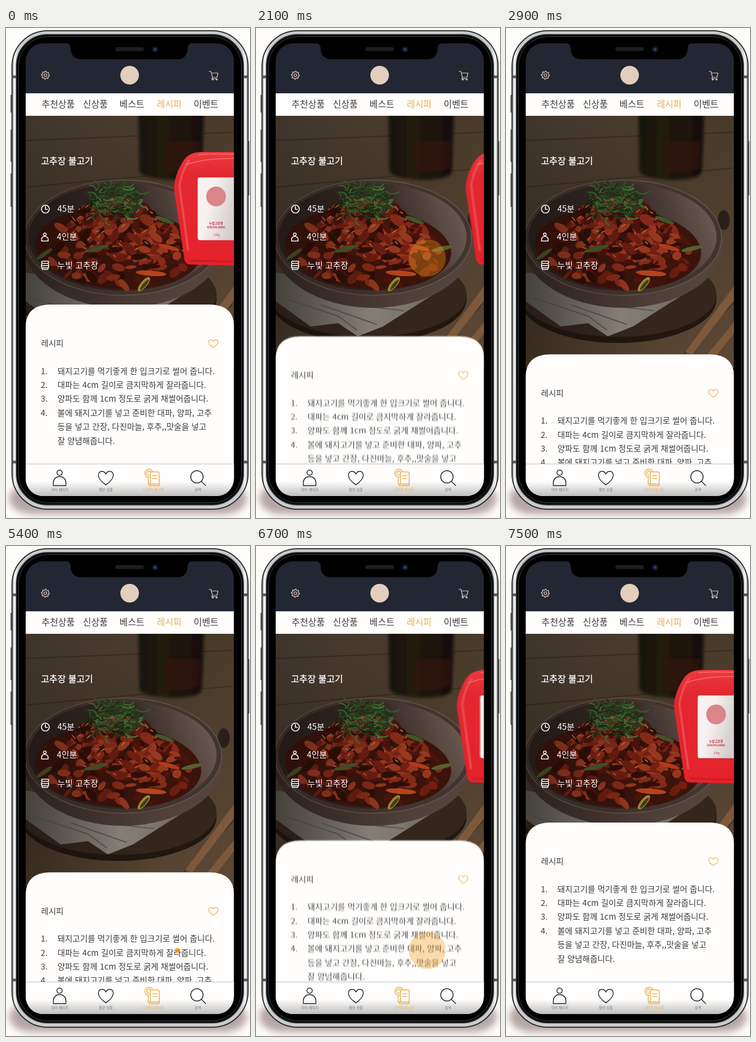
Write an HTML page that moves like this. It is 446 px wide and 893 px high and loops after 9800 ms.

```html
<!DOCTYPE html>
<html lang="ko">
<head>
<meta charset="utf-8">
<style>
html, body { margin: 0; width: 100%; height: 100%; overflow: hidden; background: #fffdf9; }
svg { display: block; width: 100vw; height: 100vh; }
text { font-family: "Noto Sans CJK KR", "Noto Sans CJK", "Noto Sans", sans-serif; font-size: 15.3px; fill: #3d3d3f; white-space: pre; }
.tabs text { font-size: 16.5px; }
.sheet text { font-size: 15px; }
.photo text { fill: #fff; }
.bar text { font-size: 6.4px; fill: #77777a; text-anchor: middle; }
.label text { font-size: 5.6px; font-weight: 700; fill: #c2303a; text-anchor: middle; }
.line { fill: none; stroke-linecap: round; stroke-linejoin: round; }
.tabs .on, .bar .on { fill: #edae4a; }
</style>
</head>
<body>
<svg viewBox="0 0 446 893">
<defs>
  <linearGradient id="steel">
    <stop offset="0" stop-color="#7d8082"/><stop offset=".01" stop-color="#f4f5f5"/>
    <stop offset=".03" stop-color="#c9cbcc"/><stop offset=".97" stop-color="#c9cbcc"/>
    <stop offset=".99" stop-color="#f4f5f5"/><stop offset="1" stop-color="#7d8082"/>
  </linearGradient>
  <linearGradient id="wood" x2=".9" y2="1">
    <stop offset="0" stop-color="#54473a"/><stop offset=".4" stop-color="#463829"/>
    <stop offset="1" stop-color="#5c4734"/>
  </linearGradient>
  <linearGradient id="jar">
    <stop offset="0" stop-color="#15110c"/><stop offset=".35" stop-color="#221c0f"/>
    <stop offset="1" stop-color="#170d0a"/>
  </linearGradient>
  <linearGradient id="bowl" x2="1" y2=".3">
    <stop offset="0" stop-color="#2f2521"/><stop offset="1" stop-color="#54433b"/>
  </linearGradient>
  <linearGradient id="well" x2="1" y2="-.2">
    <stop offset="0" stop-color="#2c221f"/><stop offset=".5" stop-color="#352823"/>
    <stop offset="1" stop-color="#79685f"/>
  </linearGradient>
  <linearGradient id="cloth" x2="1"><stop stop-color="#5a5650"/><stop offset=".6" stop-color="#8d877d"/><stop offset="1" stop-color="#6b655c"/></linearGradient>
  <linearGradient id="dark" x2="1"><stop stop-color="#0b0705" stop-opacity=".28"/><stop offset=".6" stop-color="#0b0705" stop-opacity="0"/></linearGradient>
  <linearGradient id="red" x2="0" y2="1">
    <stop offset="0" stop-color="#ee3a3f"/><stop offset=".2" stop-color="#e22830"/><stop offset="1" stop-color="#e5222b"/>
  </linearGradient>
  <linearGradient id="paper" x2="1" y2=".4"><stop offset=".4" stop-color="#f7f1f0"/><stop offset="1" stop-color="#d5cfcf"/></linearGradient>
  <linearGradient id="fade" x2="0" y2="1"><stop stop-color="#999" stop-opacity="0"/><stop offset="1" stop-color="#999" stop-opacity=".65"/></linearGradient>
  <filter id="soft" x="-20%" y="-100%" width="140%" height="300%"><feGaussianBlur stdDeviation="7"/></filter>
  <filter id="haze"><feGaussianBlur stdDeviation="2.5"/></filter>
  <filter id="blurX"><feGaussianBlur/></filter>
  <filter id="blurY"><feGaussianBlur/></filter>
  <clipPath id="screen"><rect x="36" y="28" width="380.500" height="825" rx="32"/></clipPath>
  <path id="heart" d="M0 12.500C-19 0 -14.500 -12 -7.500 -12C-3.500 -12 -1 -9.500 0 -7C1 -9.500 3.500 -12 7.500 -12C14.500 -12 19 0 0 12.500Z"/>
  <path id="person" d="M-11.500 14V8A11.500 10.500 0 0 1 11.500 8V14ZM0 -14.500A4.900 4.900 0 1 1 -.01 -14.500Z"/>
</defs>

<!-- phone body -->
<rect x="6" y="830" width="434" height="56" rx="40" fill="#b5a5a6" filter="url(#soft)"/>
<path d="M10 122V154M10 185V244M10 265V326M443 206V305" stroke="#6f7274" stroke-width="4"/>
<rect x="11" y="5" width="431.500" height="872" rx="65" fill="url(#steel)" stroke="#2d2f30" stroke-width="2"/>
<path d="M11 89H20M433 89H442M11 791H20M433 791H442" stroke="#56595b" stroke-width="5"/>
<rect x="19" y="12" width="415" height="857" rx="57" stroke="#303233" stroke-width="2"/>
<rect x="22.500" y="15.500" width="408" height="850" rx="54" stroke="#4a4c4e"/>

<g clip-path="url(#screen)">
  <g class="photo">
    <rect x="36" y="160" width="381" height="460" fill="url(#wood)"/>
    <path d="M36 205L417 190M36 290L417 255M300 620L417 500" stroke="#2a2018" stroke-width="2" opacity=".5"/>
    <path d="M242 150H362L358 262Q354 277 300 277Q248 274 244 260Z" fill="url(#jar)" filter="url(#haze)"/>
    <path d="M290 205H356L353 255Q325 266 290 262Z" fill="#351511" opacity=".65" filter="url(#haze)"/>
    <ellipse cx="205" cy="494" rx="180" ry="80" fill="#21170f"/>
    <ellipse cx="205" cy="486" rx="180" ry="77" fill="#35261c"/>
    <path d="M30 445L327 484L232 544L186 562L150 538L100 544L30 494Z" fill="url(#cloth)"/>
    <path d="M50 492L150 525L184 550M120 505L220 540M180 505L270 515" class="line" stroke="#5a564f" stroke-width="2"/>
    <path d="M420 466L328 590L340 595L420 492ZM420 532L369 594L384 598L420 552Z" fill="#7d593b"/>
    <ellipse cx="398" cy="350" rx="11" ry="18" fill="#2a201b"/>
    <ellipse cx="214" cy="393" rx="183" ry="117" fill="url(#bowl)"/>
    <ellipse cx="214" cy="382" rx="180" ry="105" fill="#42342e" stroke="#69574d" stroke-width="1.500"/>
    <ellipse cx="213" cy="381" rx="172" ry="98" fill="url(#well)"/>
    <ellipse cx="205" cy="402" rx="152" ry="74" fill="#3a130b" transform="rotate(4 205 402)"/>
    <g id="food"></g>
    <rect x="36" y="160" width="381" height="460" fill="url(#dark)"/>

    <text x="64" y="248" style="font-size:16.400px;font-weight:500" stroke="#fff" stroke-width=".3">고추장 불고기</text>
    <text x="94" y="335">45분</text>
    <text x="93" y="386">4인분</text>
    <text x="94" y="438">누빛 고추장</text>
    <g class="line" stroke="#fff" stroke-width="1.600">
      <circle cx="72" cy="330" r="7.200"/><path d="M72 325V330.500H76"/>
      <use href="#person" transform="translate(71 381) scale(.52)" stroke-width="3"/>
      <path d="M66 425H77Q79 427 77 429H66Q64 427 66 425ZM66 429Q63 434 67 440H76Q80 434 77 429M65 433H78M66 437H77"/>
    </g>
  </g>

  <g id="bottle">
    <path d="M480 226H356Q334 227 325 241Q312 260 308 282Q306 293 309 306L326 421Q328 431 338 431L480 434Z" fill="url(#red)"/>
    <path d="M334 242Q321 262 317 288L333 405" class="line" stroke="#f7666a" stroke-width="4" opacity=".55"/>
    <path d="M352 231Q380 228 430 231M330 249Q365 236 430 238" class="line" stroke="#ff7a78" stroke-width="2" opacity=".65"/>
    <path d="M336 424L430 426" stroke="#b5141d" stroke-width="3" opacity=".5"/>
    <g class="label">
      <rect x="350" y="272" width="70" height="115" rx="4" fill="url(#paper)" stroke="#b9343a" stroke-width=".7"/>
      <circle cx="384" cy="307" r="18" fill="#d9858a"/>
      <text x="384" y="358">누빛고추장</text>
      <text x="384" y="365" style="font-size:5.300px">GOCHUJANG</text>
      <text x="385" y="379" style="font-size:5px;font-weight:400">120g</text>
    </g>
  </g>

  <g class="sheet" id="sheet">
    <path d="M36 900V543Q37 505 80 504H373Q416 505 417 543V900Z" fill="#fffefd"/>
    <text x="64" y="580">레시피</text>
    <use href="#heart" class="line" transform="translate(379 575) scale(.63 .57)" stroke="#edb45a" stroke-width="2.200"/>
    <g id="steps"></g>
  </g>

  <circle id="touch" cx="313" fill="#f39a1c"/>

  <rect x="36" y="28" width="381" height="91" fill="#232733"/>
  <g class="line" stroke="#e6d0c0" stroke-width="1.200">
    <path id="gear"/><circle cx="72" cy="86" r="2.500"/>
    <path d="M371 79H374.500L377.500 90H385.500L387.500 82H375.500M377.500 90L376 92.500H386"/>
    <circle cx="378" cy="94" r="1"/><circle cx="385" cy="94" r="1"/>
  </g>
  <circle cx="226" cy="86" r="17" fill="#e3cdbd"/>

  <g class="tabs">
    <rect x="36" y="119" width="381" height="41" fill="#fffefd"/>
    <text x="65" y="145">추천상품</text><text x="140.500" y="145">신상품</text>
    <text x="207.500" y="145">베스트</text><text class="on" x="275.500" y="145">레시피</text>
    <text x="343" y="145">이벤트</text>
  </g>

  <g class="bar">
    <rect x="36" y="794" width="381" height="60" fill="#fffefd"/>
    <path d="M36 794.500H417" stroke="#cfcfd2" stroke-width="1.500"/>
    <rect x="36" y="826" width="381" height="28" fill="url(#fade)"/>
    <g class="line" stroke="#25262b" stroke-width="1.500">
      <use href="#person" x="98" y="820"/>
      <use href="#heart" x="182.500" y="820"/>
      <circle cx="349" cy="818" r="11.300"/><path d="M357 826L365 834"/>
      <g stroke="#edae4a">
        <path d="M264 809H277Q280 809 280 812V831H264ZM264 831H260V820M280 831V834H262V831M268 816H276M268 821H276"/>
        <path d="M262 819A7.500 7.500 0 1 1 268 808M262 815A3.800 3.800 0 1 1 264 809"/>
      </g>
    </g>
    <text x="98.500" y="844">마이 페이지</text><text x="182.500" y="844">찜한 상품</text>
    <text class="on" x="269.500" y="844">나만의 레시피</text><text x="351" y="844">검색</text>
  </g>
</g>

<!-- notch -->
<path d="M108 27Q118 28 118 37Q119 57 138 57H313Q331 57 332 37Q332 28 342 27Z"/>
<rect x="200" y="35" width="52" height="7" rx="3.500" fill="#1d1e20"/>
<circle cx="272.500" cy="39" r="6" fill="#10141f"/><circle cx="272.500" cy="39" r="2.800" fill="#24406e"/>
</svg>

<script>
const $ = id => document.getElementById(id);

const steps = ["돼지고기를 먹기좋게 한 입크기로 썰어 줍니다.", "대파는 4cm 길이로 큼지막하게 잘라줍니다.",
  "양파도 함께 1cm 정도로 굵게 채썰어줍니다.", "볼에 돼지고기를 넣고 준비한 대파, 양파, 고추",
  "등을 넣고 간장, 다진마늘, 후추,,맛술을 넣고", "잘 양념해줍니다."];
$("steps").innerHTML = steps.map((line, i) => {
  const y = 630.5 + i * 25.4;
  return (i < 4 ? `<text x="63.5" y="${y}">${i + 1}.</text>` : "") + `<text x="94" y="${y}">${line}</text>`;
}).join("");

// gear outline: eight teeth
$("gear").setAttribute("d", "M" + Array.from({ length: 32 }, (_, i) => {
  const r = i % 4 < 2 ? 7.4 : 5.6, a = i * Math.PI / 16;
  return `${72 + r * Math.cos(a)} ${86 + r * Math.sin(a)}`;
}).join("L") + "Z");

let seed = 7;
const rand = () => (seed = seed * 16807 % 2147483647) / 2147483647;
const pick = list => list[Math.floor(rand() * list.length)];
const inside = (cx, cy, rx, ry) => {
  const a = rand() * 2 * Math.PI, r = Math.sqrt(rand());
  return [cx + rx * r * Math.cos(a), cy + ry * r * Math.sin(a)];
};
const blob = (x, y, rx, ry, turn, fill) =>
  `<ellipse rx="${rx}" ry="${ry}" fill="${fill}" transform="translate(${x} ${y}) rotate(${turn})"/>`;

let food = "";
for (let i = 0; i < 230; i++) {
  // a third of the pieces heap up under the herbs
  const [x, y] = i % 3 ? inside(206, 406, 140, 64) : inside(200, 365, 85, 55);
  const turn = rand() * 120 - 60, rx = 6 + rand() * 10, ry = 3 + rand() * 5;
  food += blob(x, y, rx, ry, turn, pick(["#6b1d10", "#842a17", "#4a140b", "#96381f", "#2d0e08", "#741f12"]));
  if (i % 3 == 0) food += blob(x - 1, y - 2, rx * .4, 1, turn, "#c06a47");
}
food += blob(265, 447, 28, 5, 4, "#b4441c") + blob(252, 467, 16, 6, -50, "#a3852e") + blob(253, 468, 12, 3, -50, "#3a421c")
  + blob(165, 402, 24, 4, -14, "#45562a") + blob(298, 400, 20, 4, 15, "#b23a1c") + blob(290, 350, 18, 4, 20, "#46542a")
  + blob(70, 412, 17, 4, -35, "#4a5226") + blob(340, 402, 20, 4, -12, "#58602f");
for (let i = 0; i < 170; i++) {
  const [x, y] = inside(200, 316, 50, 31), a = rand() * Math.PI * 2, l = 8 + rand() * 10;
  food += `<path class="line" d="M${x} ${y}q${l * Math.cos(a + .8)} ${l * Math.sin(a + .8) * .7} ${l * 1.4 * Math.cos(a)} ${l * Math.sin(a)}" `
    + `stroke="${pick(["#2b4520", "#38562b", "#1b2f16", "#4b6b38", "#243b1b"])}" stroke-width="${1.5 + rand() * 1.5}"/>`;
}
$("food").innerHTML = food;

const LOOP = 9800, STEP = 100, TAPS = [800, 5400];
const clamp = x => Math.min(1, Math.max(0, x));
const slide = t => 1 - (1 - clamp((t - 780) / 1300)) ** 2;

function move(id, dx, dy, filter, blur) {
  $(id).setAttribute("transform", `translate(${dx} ${dy})`);
  $(id).setAttribute("filter", blur ? `url(#${filter})` : "none");
}

function draw(now) {
  const t = Math.floor(now % LOOP / STEP) * STEP;
  const [down, up] = TAPS.map(tap => slide(t - tap));
  const back = t >= TAPS[1], age = t - TAPS[+back], p = back ? up : down;
  const blur = p > 0 && p < 1 ? Math.sqrt(1 - p) * 1.7 : 0;
  $("blurX").firstChild.setAttribute("stdDeviation", `${blur} 0`);
  $("blurY").firstChild.setAttribute("stdDeviation", `0 ${blur}`);
  move("sheet", 0, 90.7 * (down - up), "blurY", blur);
  move("bottle", 136 * (down ** 1.3 - up ** 1.3), 0, "blurX", blur);

  const touch = $("touch");
  touch.setAttribute("cy", back ? 737 : 419);
  touch.setAttribute("r", age < 0 ? 0 : Math.min(34, 4 + age * .0288));
  touch.setAttribute("opacity", clamp((1740 - age) / 1250));
  requestAnimationFrame(() => draw(performance.now() - start));
}
const start = performance.now();
draw(0);
</script>
</body>
</html>
```
